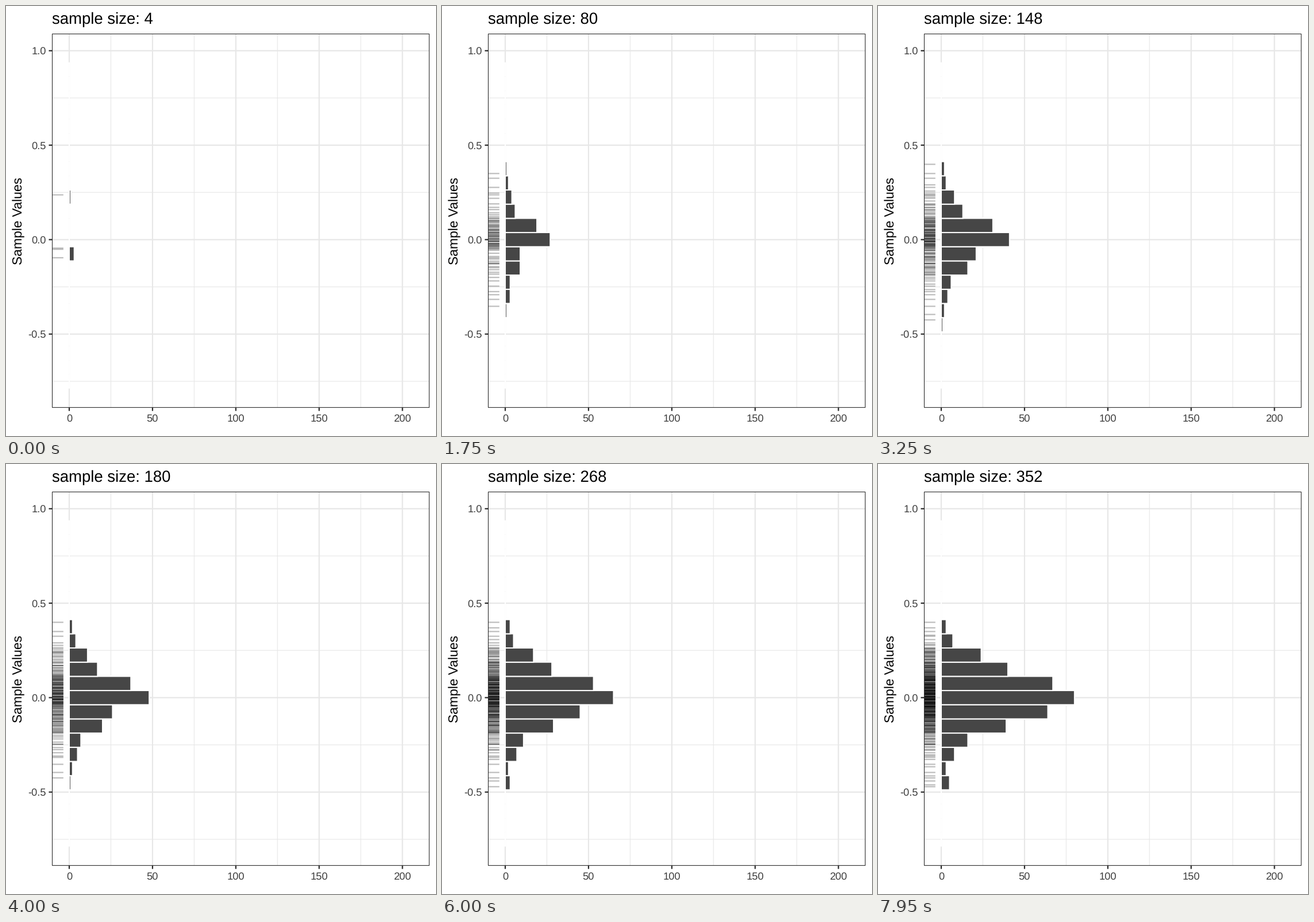
Write a matplotlib script that moves like this. It is 748x748 px and loops after 8 s.

```python
import numpy as np
import matplotlib.pyplot as plt
from matplotlib.animation import FuncAnimation
from matplotlib.collections import LineCollection
from matplotlib.patches import Rectangle

plt.rcParams.update({
    "font.family": "Liberation Sans",
    "text.hinting": "none",
    "path.snap": False,
    "toolbar": "None",
})

SIZE, DPI = 748, 100
FRAMES, INTERVAL = 160, 50
LEFT, RIGHT, TOP, BOTTOM = 80.5, 736.2, 48.6, 698.4
X0, X_UNIT = 110, 2.898
Y0, Y_UNIT = 406.4, 328.6
BIN = 0.0751
LINE = 2.2
GRID, DARK, BAR, LABEL = "#e7e7e7", "#2b2b2b", "#464646", "#3d3d3d"

# Final bar lengths from bin 5 down to -6; each grows as time ** pace
TOTALS = [3, 7, 24, 40, 67, 80, 64, 39, 16, 8, 3, 5]
PACES = [0.6, 1, 1.2, 1.25, 0.87, 0.75, 1.3, 1, 1.2, 0.7, 0.7, 2]
START = [0.237, -0.045, -0.051, -0.096]
GOLDEN = (5 ** 0.5 - 1) / 2


def px(v):
    return X0 + v * X_UNIT


def py(v):
    return Y0 - v * Y_UNIT


def pt(pixels):
    return pixels * 72 / DPI


def bin_of(values):
    return np.rint(np.asarray(values) / BIN).astype(int)


def make_samples():
    """All sample values in order of arrival, spread evenly in each bin."""
    rng = np.random.default_rng(12)
    arrivals = []
    for k, total, pace in zip(range(5, -7, -1), TOTALS, PACES):
        side = -1 if k < 0 else 1
        for j in range(np.count_nonzero(bin_of(START) == k), total):
            offset = (0.16 + GOLDEN * j) % 1 - 0.5 + rng.normal(0, 0.03)
            value = (k + side * np.clip(offset, -0.48, 0.48)) * BIN
            arrivals.append((((j + 0.5) / total) ** (1 / pace), value))
    return np.array(START + [value for _, value in sorted(arrivals)])


SAMPLES = make_samples()
SAMPLE_BINS = bin_of(SAMPLES)

fig = plt.figure(figsize=(SIZE / DPI, SIZE / DPI), dpi=DPI, facecolor="white")
ax = fig.add_axes([0, 0, 1, 1])
ax.set_xlim(0, SIZE)
ax.set_ylim(SIZE, 0)
ax.axis("off")


def line(xs, ys, color, width, z):
    ax.plot(xs, ys, color=color, lw=pt(width), zorder=z,
            solid_capstyle="butt", snap=False)


def text(x, y, s, size, color="black", ha="left", rotation=0):
    return ax.text(x, y, s, fontsize=pt(size), color=color, ha=ha,
                   va="baseline", rotation=rotation, rotation_mode="anchor")


def grid_x(v, width, z):
    line([px(v)] * 2, [TOP, BOTTOM], GRID, width, z)


def grid_y(v, width, z):
    line([LEFT, RIGHT], [py(v)] * 2, GRID, width, z)


for v in range(25, 200, 50):
    grid_x(v, LINE / 2, 1)
for v in np.arange(-0.75, 1, 0.5):
    grid_y(v, LINE / 2, 1)
for v in range(0, 201, 50):
    grid_x(v, LINE, 2)
    line([px(v)] * 2, [BOTTOM, BOTTOM + 6], DARK, LINE, 2)
    text(px(v), 722.8, str(v), 18.3, LABEL, "center")
for v in np.arange(-0.5, 1.1, 0.5):
    grid_y(v, LINE, 2)
    line([LEFT - 6, LEFT], [py(v)] * 2, DARK, LINE, 2)
    text(69.9, py(v) + 6.5, f"{v:.1f}", 18.3, LABEL, "right")

ax.add_patch(Rectangle((LEFT, TOP), RIGHT - LEFT, BOTTOM - TOP, fill=False,
                       ec=DARK, lw=pt(1.1), zorder=6, snap=False))
text(28, 373.5, "Sample Values", 22.9, ha="center", rotation=90)
title = text(80, 31.5, "", 27.5)

bars = {}
for k in range(-10, 13):
    bars[k] = ax.add_patch(Rectangle(
        (X0, py((k + 0.5) * BIN)), 0, BIN * Y_UNIT, fc=BAR, ec="white",
        lw=pt(2), joinstyle="miter", zorder=4, snap=False))

rug = LineCollection([], colors=[(0, 0, 0, 0.26)], linewidths=pt(LINE),
                     capstyle="butt", zorder=5, snap=False)
ax.add_collection(rug, autolim=False)


def draw(i):
    # The bars and rug step ahead of the title by half a state
    half = (11 * i + 5) // 10
    title.set_text(f"sample size: {4 * (half // 2 + 1)}")
    n = 4 * ((half + 1) // 2 + 1)
    for k, bar in bars.items():
        bar.set_width(np.count_nonzero(SAMPLE_BINS[:n] == k) * X_UNIT)
    rug.set_segments([[(81, py(v)), (99.8, py(v))] for v in SAMPLES[:n]])
    return [title, rug, *bars.values()]


anim = FuncAnimation(fig, draw, frames=FRAMES, interval=INTERVAL,
                     init_func=lambda: draw(0), repeat=True, repeat_delay=0,
                     blit=False)
plt.show()
```
